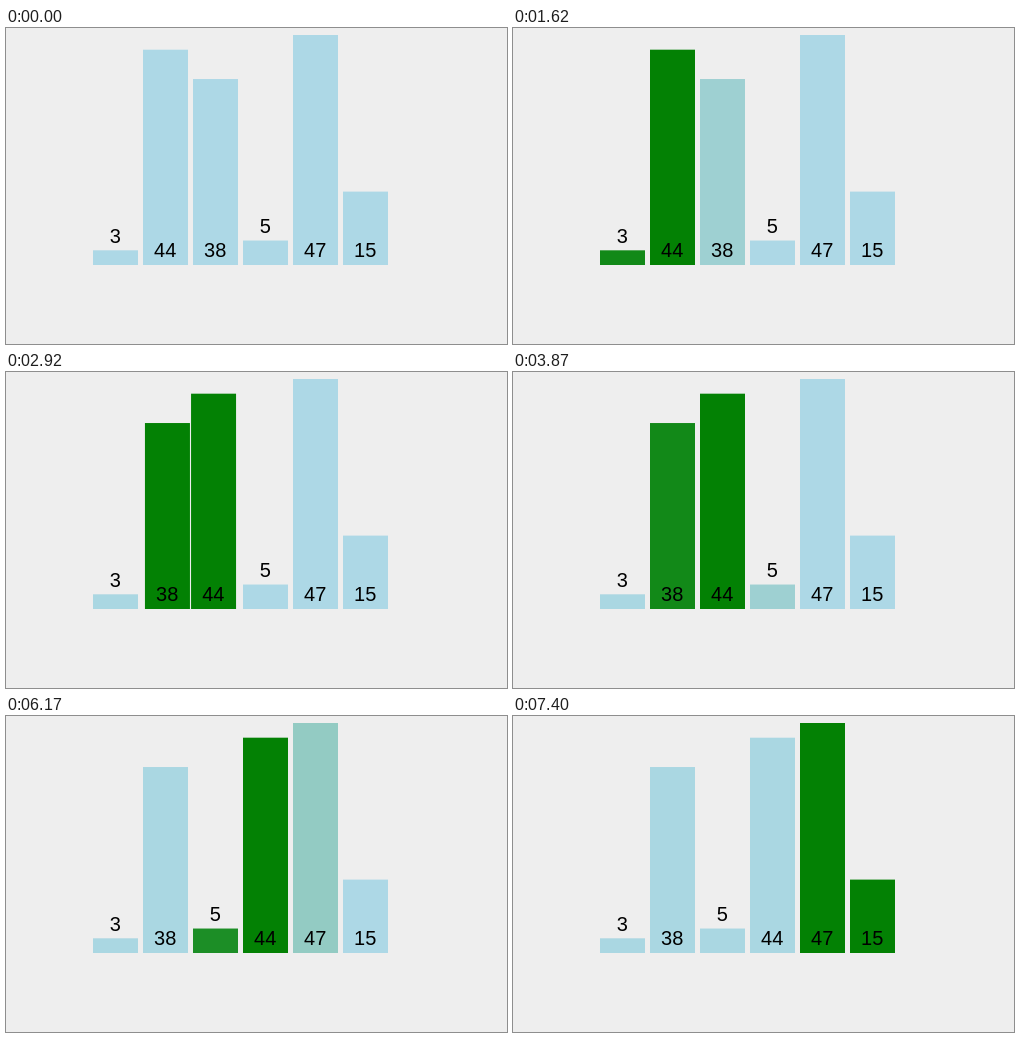
An HTML page with a canvas for the animation above (8000 ms loop, 501 px wide and 316 px high).

```html
<!DOCTYPE html>
<html lang="en">
<head>
<meta charset="utf-8">
<title>Bubble sort</title>
<style>
  html, body { margin: 0; width: 100%; height: 100%; overflow: hidden; background: #eee; }
  canvas { display: block; width: 501px; height: 316px; }
</style>
</head>
<body>
<canvas id="stage"></canvas>
<script>
const W = 501, H = 316, LOOP = 8000;
const BASE = 237, LEFT = 87, PITCH = 50, BAR = 45, SCALE = 230 / 47;
const BLUE = [173, 216, 230], GREEN = [0, 128, 0];
const values = [3, 44, 38, 5, 47, 15];

// Each phase runs from `at` to `end` in `steps` pictures;
// `from` and `to` are the eased timeline's limits.
const mark = (at, end, steps, on, off, from = 0.28) =>
  ({ at, end, steps, on, off, swap: [], from, to: 0.84 });
const swap = (at, end, steps, a, b, from) =>
  ({ at, end, steps, on: [], off: [], swap: [a, b], from, to: 1 });

const phases = [
  mark(500, 610, 5, [0, 1], [], 0.335),
  mark(1620, 1760, 6, [2], [0]),
  swap(2690, 2950, 10, 1, 2, 0.04),
  mark(3870, 4010, 6, [3], [2]),
  swap(4970, 5210, 9, 1, 3, 0.08),
  mark(6170, 6280, 5, [4], [3], 0.335),
  mark(7260, 7400, 6, [5], [1])
];

const canvas = document.getElementById("stage");
const ctx = canvas.getContext("2d");
const dpr = window.devicePixelRatio || 1;
canvas.width = Math.round(W * dpr);
canvas.height = Math.round(H * dpr);
ctx.scale(dpr, dpr);

const lerp = (a, b, p) => a + (b - a) * p;
const cubicInOut = u => u < 0.5 ? 4 * u ** 3 : 1 - 4 * (1 - u) ** 3;

function progress(ph, t) {
  const last = ph.steps - 1;
  const k = Math.min(last, Math.floor((t - ph.at) / (ph.end - ph.at) * last + 1e-6));
  return cubicInOut(lerp(ph.from, ph.to, k / last));
}

function barsAt(t) {
  const bars = values.map((value, slot) => ({ value, slot, green: 0 }));
  for (const ph of phases) {
    if (t < ph.at) break;
    const p = progress(ph, t);
    for (const i of ph.on) bars[i].green = lerp(bars[i].green, 1, p);
    for (const i of ph.off) bars[i].green = lerp(bars[i].green, 0, p);
    if (ph.swap.length) {
      const [a, b] = ph.swap.map(i => bars[i]);
      [a.slot, b.slot] = [lerp(a.slot, b.slot, p), lerp(b.slot, a.slot, p)];
    }
  }
  return bars;
}

function drawBar({ value, slot, green }) {
  const x = LEFT + slot * PITCH, h = value * SCALE;
  const rgb = BLUE.map((c, i) => Math.round(lerp(c, GREEN[i], green)));
  ctx.fillStyle = `rgb(${rgb})`;
  ctx.fillRect(x, BASE - h, BAR, h);
  ctx.fillStyle = "#000";
  ctx.fillText(value, x + 22.2, value < 10 ? Math.round(BASE - h - 7.3) : BASE - 8);
}

function draw(t) {
  ctx.fillStyle = "#eee";
  ctx.fillRect(0, 0, W, H);
  ctx.font = '20px "Liberation Sans", Helvetica, Arial, sans-serif';
  ctx.textAlign = "center";
  barsAt(t).forEach(drawBar);
}

const start = performance.now();
function tick() {
  draw((performance.now() - start) % LOOP);
  requestAnimationFrame(tick);
}
tick();
</script>
</body>
</html>
```
